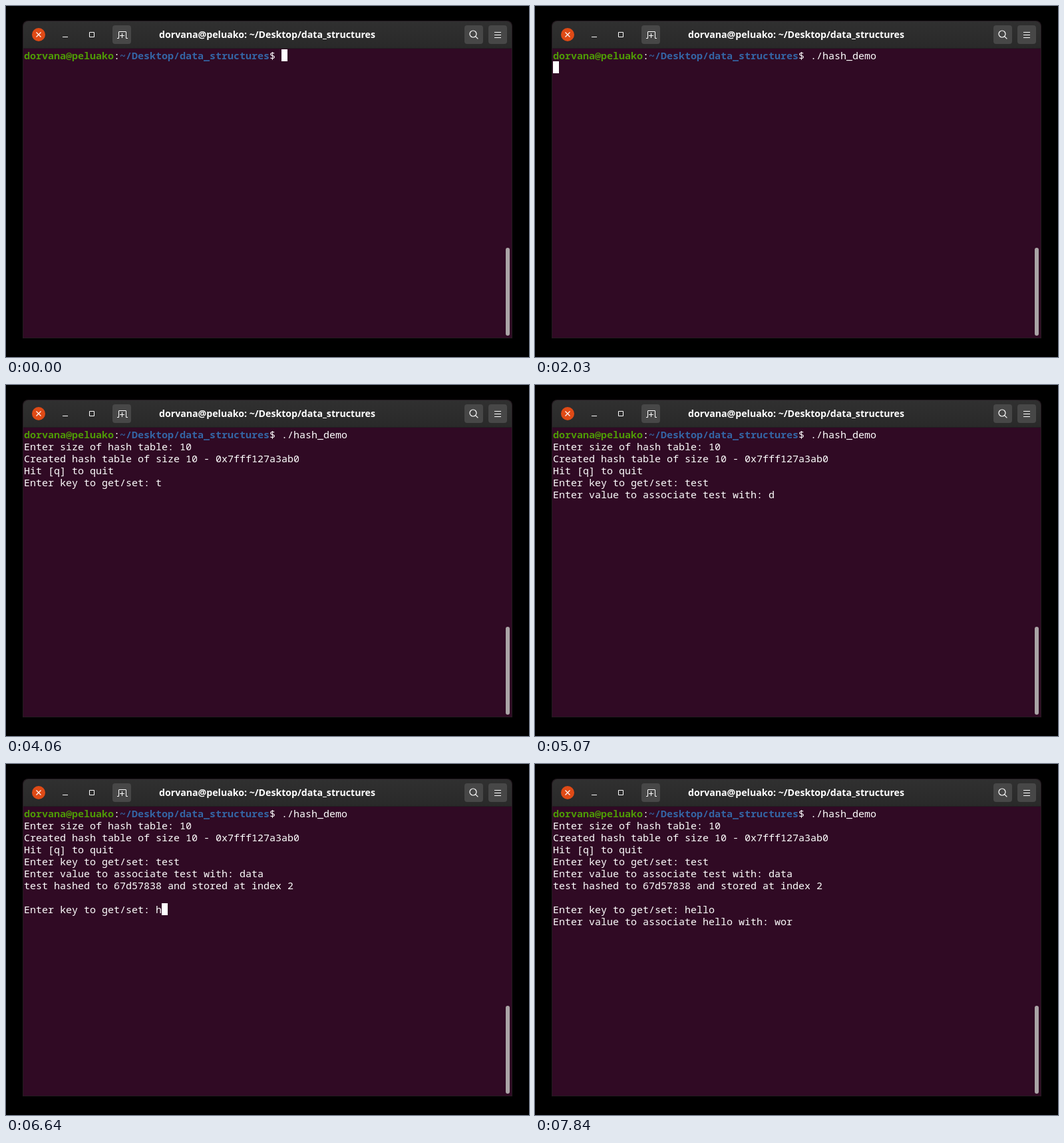
Write an HTML page that moves like this. It is 786 px wide and 527 px high and loops after 8 s.

```html
<!DOCTYPE html>
<html lang="en">
<head>
<meta charset="utf-8">
<title>Terminal</title>
<style>
  html, body { margin: 0; width: 100%; height: 100%; overflow: hidden; background: #000; }
  svg { display: block; }
  .title { font: bold 14.15px "Open Sans", sans-serif; fill: #fff; text-anchor: middle; }
  .term { font: 15px "Noto Sans Mono", monospace; fill: #fff; }
  .term text { white-space: pre; }
  .user { fill: #4e9a06; font-weight: bold; }
  .path { fill: #3465a4; font-weight: bold; }
  .icon { fill: none; stroke: #fff; }
  .round { stroke-width: 1.2; }
</style>
</head>
<body>
<svg width="786" height="527" viewBox="0 0 786 527">
  <defs>
    <linearGradient id="bar" x2="0" y2="1">
      <stop stop-color="#303030"/>
      <stop offset="1" stop-color="#292929"/>
    </linearGradient>
  </defs>
  <rect width="786" height="527"/>
  <path d="M25 499V30a8 8 0 0 1 8-8H753a8 8 0 0 1 8 8V499Z" fill="#241a20"/>
  <path d="M26 64V31a8 8 0 0 1 8-8H752a8 8 0 0 1 8 8V64Z" fill="url(#bar)"/>
  <rect x="26" y="64" width="734" height="434" fill="#300a24"/>
  <rect x="26" y="63" width="734" height="1" fill="#202020"/>

  <circle cx="49" cy="43" r="10" fill="#df4a16"/>
  <g fill="#474747">
    <rect x="160" y="29" width="28" height="28" rx="4"/>
    <rect x="689" y="29" width="28" height="28" rx="4"/>
    <rect x="725" y="29" width="28" height="28" rx="4"/>
  </g>
  <g class="icon">
    <path class="round" d="M45.5 39.5l7 7m0-7l-7 7"/>
    <path d="M85 46.5h8M125.5 39.5h7v7h-7z"/>
    <path d="M167 48.5h2.5v-9.5q0-.5.5-.5h10q.5 0 .5.5v9.5h2.5M171 44.5h7m-3.5-3.5v7"/>
    <circle class="round" cx="702" cy="42" r="5"/>
    <path class="round" d="M705.6 45.6l3.8 3.8"/>
    <path d="M734 39.5h10m-10 4h10m-10 4h10"/>
  </g>
  <text class="title" x="392.5" y="48">dorvana@peluako: ~/Desktop/data_structures</text>
  <rect x="751" y="363" width="6" height="132" rx="3" fill="#aaa4a6"/>

  <g class="term" id="term">
    <text x="27" y="80"><tspan class="user">dorvana@peluako</tspan>:<tspan class="path">~/Desktop/data_structures</tspan>$</text>
  </g>
  <rect id="cursor" width="9" height="18" fill="#fff"/>
</svg>
<script>
const LOOP = 8000, CELL_W = 9, CELL_H = 18, LEFT = 27, TOP = 65, PROMPT = 43;
const term = document.getElementById('term');
const cursor = document.getElementById('cursor');
const events = [];

const put = (time, row, text, blinkOn = true) => events.push({ time, row, text, blinkOn });

// Adds one letter of the word at each given time.
const type = (row, prefix, word, times, blinkOn) =>
  times.forEach((time, i) => put(time, row, prefix + word.slice(0, i + 1), blinkOn));

const SIZE = 'Enter size of hash table: ';
const KEY = 'Enter key to get/set: ';
const value = key => `Enter value to associate ${key} with: `;

put(0, 0, '');
type(0, '', './has', [1150, 1200, 1510, 1560, 1620]);
put(1820, 0, './hash_demo ');
put(2030, 1, '');
put(2130, 1, SIZE);
put(2540, 1, SIZE + '1');
put(2670, 1, SIZE + '10', false);
put(4060, 2, 'Created hash table of size 10 - 0x7fff127a3ab0', false);
put(4060, 3, 'Hit [q] to quit', false);
type(4, KEY, 'test', [4060, 4150, 4240, 4340], false);
type(5, value('test'), 'dat', [5070, 5160, 5250], false);
put(5350, 5, value('test') + 'data');
put(5590, 5, value('test') + "data'");
put(5900, 5, value('test') + 'data');
put(6130, 6, '');
put(6640, 6, 'test hashed to 67d57838 and stored at index 2');
type(8, KEY, 'hello', [6640, 6700, 6820, 6970, 7170]);
put(7380, 8, KEY + 'hello', false);
type(9, value('hello'), 'wor', [7620, 7770, 7840], false);

const column = row => row === 0 ? PROMPT : 0;
const rows = Array.from({ length: 10 }, (_, row) => {
  const line = document.createElementNS('http://www.w3.org/2000/svg', 'text');
  line.setAttribute('x', LEFT + CELL_W * column(row));
  line.setAttribute('y', TOP + 15 + CELL_H * row);
  return term.appendChild(line);
});

function draw() {
  const now = performance.now() % LOOP;
  const past = events.filter(e => e.time <= now);
  const texts = rows.map(() => '');
  past.forEach(e => { texts[e.row] = e.text; });
  rows.forEach((line, i) => {
    if (line.textContent !== texts[i]) line.textContent = texts[i];
  });

  const { row, text, blinkOn } = past[past.length - 1];
  cursor.setAttribute('x', LEFT + CELL_W * (column(row) + text.length));
  cursor.setAttribute('y', TOP + CELL_H * row);
  cursor.setAttribute('visibility', blinkOn ? 'visible' : 'hidden');
  requestAnimationFrame(draw);
}
draw();
</script>
</body>
</html>
```
